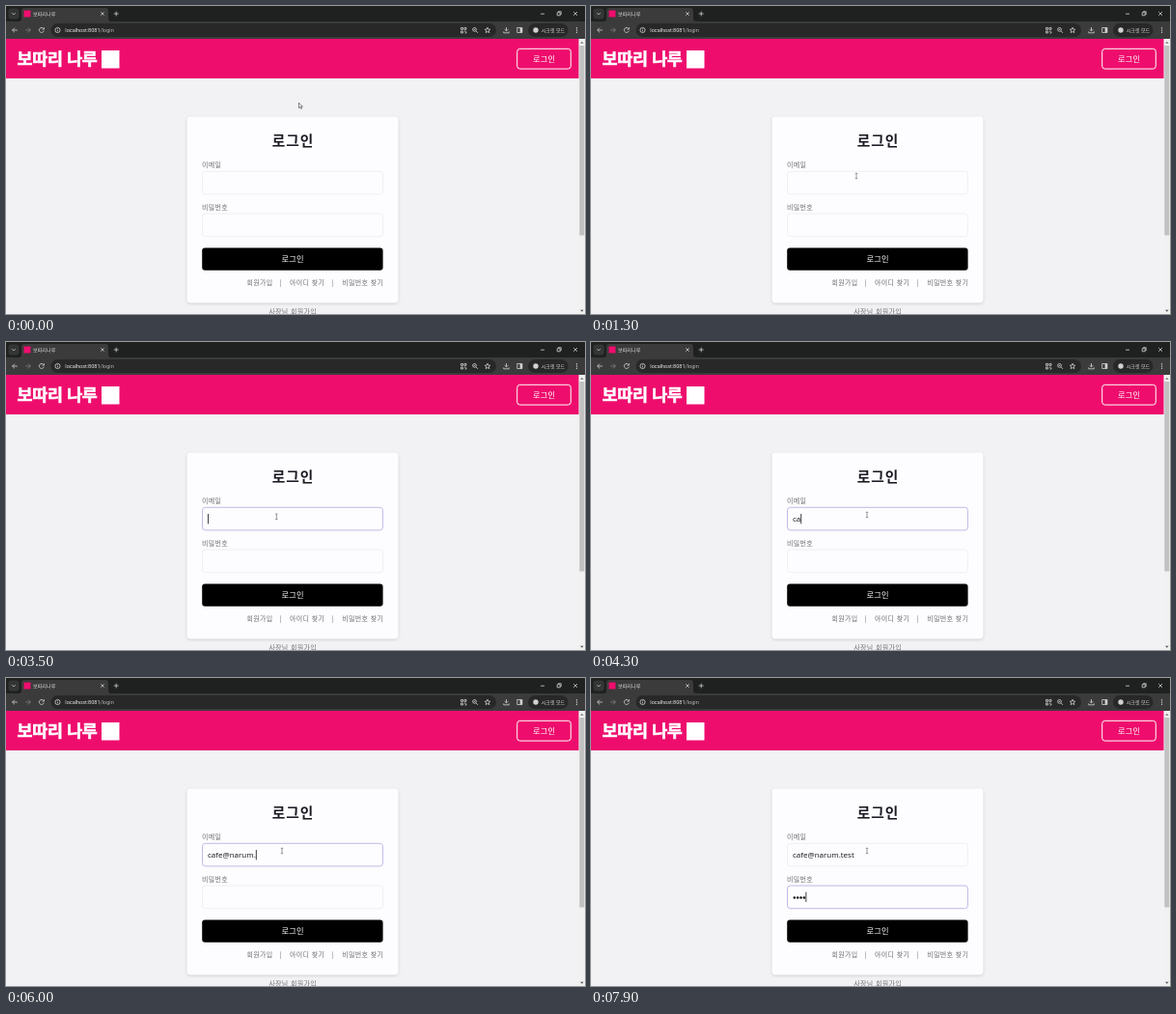
An HTML page that plays this animation: 600 px wide and 319 px high, repeating every 8000 ms.

```html
<!DOCTYPE html>
<html lang="ko">
<head>
<meta charset="utf-8">
<title>로그인</title>
<style>
  html, body { margin: 0; width: 100%; height: 100%; overflow: hidden; background: #f2f1f4; }
  svg { display: block; width: 600px; height: 319px; }
  text { font-family: "Noto Sans CJK KR", "Noto Sans CJK", sans-serif; white-space: pre; }
  .latin { font-family: "Open Sans", "Noto Sans", sans-serif; }
  .url { font-family: Roboto, sans-serif; }
  .small { fill: #6e6e75; font-size: 7px; letter-spacing: .35px; }
  .icon { fill: none; stroke: #d2d2d2; stroke-width: .8; }
  .dim { stroke: #858585; }
  .field { fill: #fdfcfe; stroke: #ececf0; stroke-width: .8; }
  .field.focus { stroke: #bab4e6; stroke-width: .9; }
  .card { filter: drop-shadow(0 1px 1.5px rgba(0, 0, 0, .14)); }
</style>
</head>
<body>
<svg id="stage" viewBox="0 0 600 319">
  <!-- browser frame -->
  <rect width="600" height="17" fill="#1f2020"/>
  <rect y="16" width="600" height="18" fill="#3b3b3b"/>
  <rect x="2.5" y="2.5" width="11" height="11" rx="3" fill="#343535"/>
  <path d="M13 16q3 0 3-3V5q0-3 3-3h84q3 0 3 3v8q0 3 3 3z" fill="#3b3b3b"/>
  <path class="icon" d="M6.3 7.2l1.7 1.7 1.7-1.7M98.3 6.3l3.4 3.4m0-3.4l-3.4 3.4M111.8 8h4.8m-2.4-2.4v4.8"/>
  <rect x="18.5" y="4.5" width="7" height="7" fill="#ee0d6d"/>
  <path class="icon" d="M554 8.2h4M571.2 6.8h3v3h-3zM572.2 6.5v-.8h3v3h-.8M588.2 6l3.8 3.8m0-3.8l-3.8 3.8"/>

  <rect x="46.5" y="18" width="461.5" height="14" rx="7" fill="#282828"/>
  <path class="icon" d="M11.8 25H6.6m2.4-2.4L6.6 25l2.4 2.4"/>
  <path class="icon dim" d="M20.2 25h5.2m-2.4-2.4l2.4 2.4-2.4 2.4"/>
  <path class="icon" d="M39 23.6a2.5 2.5 0 1 0 .3 2M39.4 22.2v1.9h-1.9"/>
  <circle class="icon" cx="53.5" cy="25" r="2.6"/>
  <path class="icon" d="M53.5 24.7v1.7M53.5 23.4v.6"/>
  <path class="icon" d="M471.5 22.4h2v2h-2zM475 22.4h2v2h-2zM471.5 26h2v2h-2zM475 26h.9v.9M477 26.5v1.5h-1.5"/>
  <circle class="icon" cx="485.5" cy="24.4" r="1.9"/>
  <path class="icon" d="M487 25.9l2 2M484.7 24.4h1.6"/>
  <path class="icon" d="M499 22.2l.8 1.9 2 .2-1.5 1.3.5 2-1.8-1.1-1.8 1.1.5-2-1.5-1.3 2-.2z"/>
  <path class="icon" d="M518.5 22v3.8m-1.8-1.7l1.8 1.8 1.8-1.8M515.7 26.4v1.4h5.6v-1.4"/>
  <path class="icon" d="M529.7 22.5h5.2v5h-5.2z"/>
  <path d="M532.6 22.5h2.3v5h-2.3z" fill="#d2d2d2"/>
  <rect x="541" y="18" width="41.5" height="14" rx="7" fill="#282828"/>
  <circle cx="549" cy="25" r="2.7" fill="#d2d2d2"/>
  <g fill="#d2d2d2"><circle cx="591.5" cy="22.8" r=".7"/><circle cx="591.5" cy="25" r=".7"/><circle cx="591.5" cy="27.2" r=".7"/></g>

  <!-- page -->
  <rect y="34" width="600" height="285" fill="#f2f1f4"/>
  <rect y="34" width="594" height="41" fill="#ee0d6d"/>
  <rect x="99" y="46" width="18.5" height="18.5" fill="#fff"/>
  <rect x="529.7" y="44.3" width="55.6" height="20.8" rx="3" fill="none" stroke="#fff"/>

  <rect x="593.5" y="34" width="6.5" height="285" fill="#f1f1f1"/>
  <rect x="594.3" y="41" width="5" height="196.5" fill="#c1c1c1"/>
  <path d="M595 38.7l1.8-2 1.8 2z" fill="#777"/>
  <path d="M595 314.8l1.8 2 1.8-2z" fill="#555"/>

  <rect class="card" x="187.5" y="114.5" width="219" height="193" rx="4" fill="#fdfcfe"/>
  <rect id="mailBox" class="field" x="203.5" y="171.3" width="187" height="23.6" rx="3"/>
  <rect id="passBox" class="field" x="203.5" y="215.1" width="187" height="23.6" rx="3"/>
  <rect x="203.2" y="250.4" width="187.4" height="23.4" rx="3" fill="#000"/>

  <g id="labels"></g>
  <text id="mail" class="latin" x="209" y="186.3" font-size="8" fill="#111"></text>
  <g id="dots" fill="#111"></g>
  <rect id="caret" width=".8" height="10.3" fill="#111"/>

  <path id="arrow" d="M0 0v5.4l1.3-1.2.9 2 .9-.4-.9-1.9h1.7z" fill="#fff" stroke="#333" stroke-width=".6"/>
  <path id="beam" d="M-1.2-2.7h2.4M0-2.7v5.4M-1.2 2.7h2.4" fill="none" stroke="#555" stroke-width=".6"/>
</svg>
<script>
const $ = id => document.getElementById(id);
const LOOP = 8000, TICK = 100;
const ADDRESS = 'cafe@narum.test';

function add(parent, tag, attrs, content = '') {
  const el = document.createElementNS('http://www.w3.org/2000/svg', tag);
  for (const key in attrs) el.setAttribute(key, attrs[key]);
  el.textContent = content;
  return parent.appendChild(el);
}

// y is the middle line of the text
function label(content, x, y, size, fill, extra = {}) {
  return add($('labels'), 'text', { x, y: y + size * .37, 'font-size': size, fill, ...extra }, content);
}

function small(content, x, y, anchor = 'start') {
  add($('labels'), 'text', { x, y: y + 2.6, class: 'small', 'text-anchor': anchor }, content);
}

const middle = { 'text-anchor': 'middle' };

label('보따리나루', 28, 8.1, 5.1, '#dedede');
const url = label('localhost:8081', 61.3, 25, 5.5, '#e4e4e4', { class: 'url' });
add(url, 'tspan', { fill: '#b4b4b4' }, '/login');
label('시크릿 모드', 554.7, 25, 5, '#dedede');
label('보따리 나루', 11.5, 54.7, 17.4, '#fff',
  { 'font-weight': 900, stroke: '#fff', 'stroke-width': .6, 'letter-spacing': -.3 });
label('로그인', 557.6, 55, 8.2, '#fff', { ...middle, 'letter-spacing': .2 });
label('로그인', 297.5, 139.6, 14.7, '#1b1b24', { ...middle, 'font-weight': 700, 'letter-spacing': 1 });
label('로그인', 297.1, 262.2, 8.2, '#fff', { ...middle, 'letter-spacing': .2 });
small('이메일', 203, 164.2);
small('비밀번호', 203, 208.1);
small('회원가입', 276.6, 286.8, 'end');
small('|', 284.8, 286.8, 'middle');
small('아이디 찾기', 330.3, 286.8, 'end');
small('|', 338.7, 286.8, 'middle');
small('비밀번호 찾기', 391.3, 286.8, 'end');
small('사장님 회원가입', 297.2, 316.2, 'middle');

const dots = [0, 1, 2, 3].map(i => add($('dots'), 'circle', { cx: 210.8 + i * 3.35, cy: 227.5, r: 1.25 }));

// pointer path: time, x, y
const path = [
  [0, 303.5, 100.3], [700, 279, 88.2], [900, 279, 88.2], [1300, 275, 176],
  [2600, 275, 176], [2700, 274, 183], [2800, 275, 183], [2900, 275, 183],
  [3300, 280, 181], [3600, 280.5, 180.7], [4000, 286, 179], [LOOP, 286, 179]
];
const mailKeys = [4200, 4300, 4400, 4500, 5100, 5300, 5500, 5700, 5800, 5900, 6000, 6200, 6300, 6400, 6500];
const passKeys = [7200, 7300, 7400, 7500];
const FOCUS = 3200, TAB = 7100;
const BLINK_OFF = [3700, 4200];

function pointAt(t) {
  const i = path.findIndex(p => p[0] > t);
  const [t0, x0, y0] = path[i - 1], [t1, x1, y1] = path[i];
  const k = (t - t0) / (t1 - t0);
  return [x0 + (x1 - x0) * k, y0 + (y1 - y0) * k];
}

const typed = (keys, t) => keys.filter(k => k <= t).length;
const show = (el, on) => el.setAttribute('visibility', on ? 'visible' : 'hidden');

function draw(now) {
  const t = Math.floor(now % LOOP / TICK) * TICK;
  const [x, y] = pointAt(t);
  const overField = y > 171 && y < 195;
  for (const id of ['arrow', 'beam']) $(id).setAttribute('transform', `translate(${x} ${y})`);
  show($('arrow'), !overField);
  show($('beam'), overField);

  const inPass = t >= TAB, inMail = t >= FOCUS && !inPass;
  $('mailBox').classList.toggle('focus', inMail);
  $('passBox').classList.toggle('focus', inPass);

  const mail = ADDRESS.slice(0, typed(mailKeys, t));
  const count = typed(passKeys, t);
  $('mail').textContent = mail;
  dots.forEach((dot, i) => show(dot, i < count));

  const mailWidth = mail ? $('mail').getComputedTextLength() : 0;
  $('caret').setAttribute('x', 209.1 + (inPass ? count * 3.35 : mailWidth));
  $('caret').setAttribute('y', inPass ? 221.7 : 178);
  show($('caret'), t >= FOCUS && !(t >= BLINK_OFF[0] && t < BLINK_OFF[1]));
}

function frame() {
  draw(performance.now());
  requestAnimationFrame(frame);
}
frame();
</script>
</body>
</html>
```
